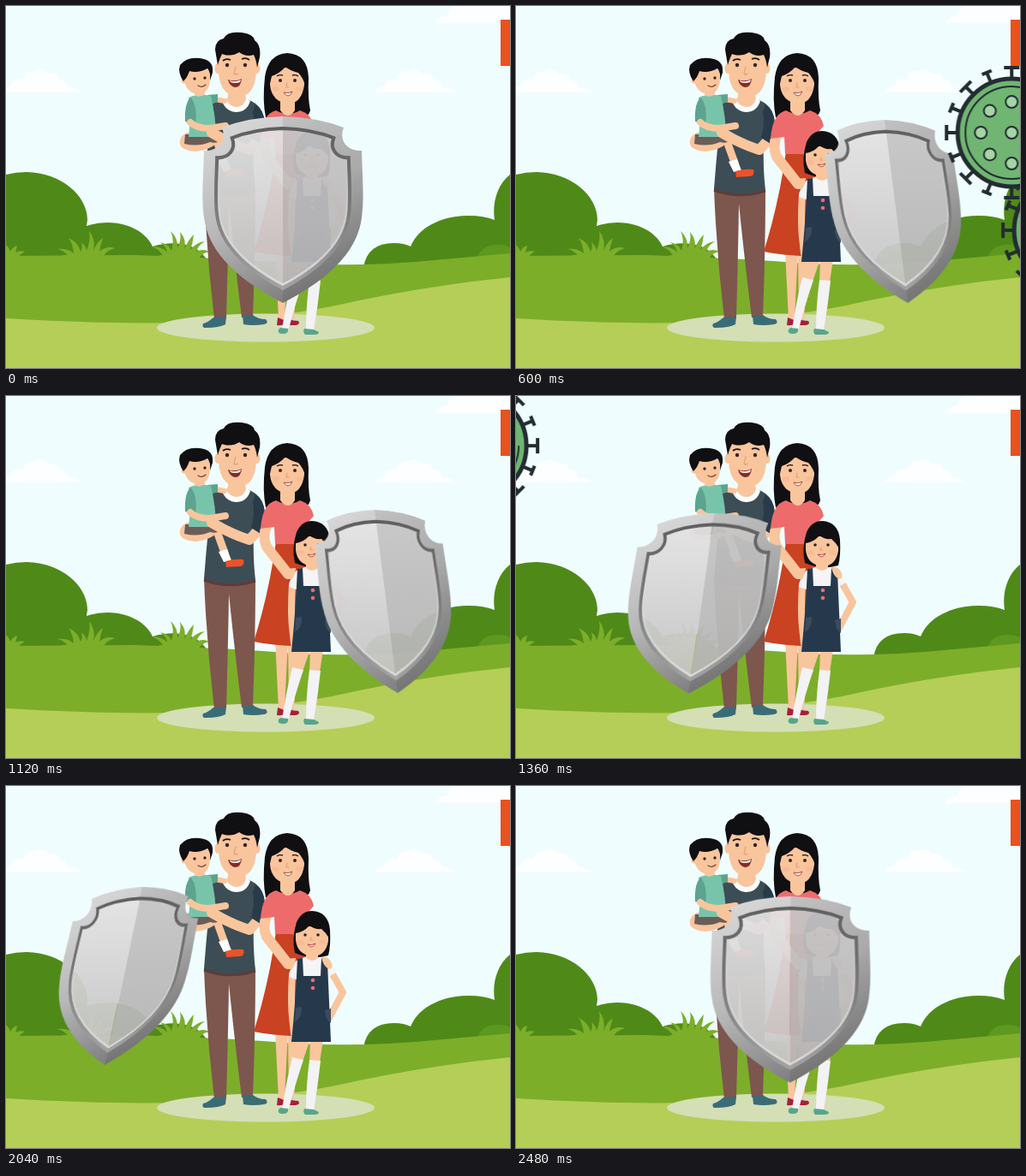
These frames come from a looping animation (588 by 423 pixels, 2.52 s). An HTML page:

```html
<!DOCTYPE html>
<html lang="en">
<head>
<meta charset="utf-8">
<title>Family behind a shield</title>
<style>
html, body { margin: 0; width: 100%; height: 100%; overflow: hidden; background: #f0fdff; }
svg { display: block; width: 588px; height: 423px; }
.skin { fill: #f9c59d; }
.limb { fill: none; stroke: #f9c59d; stroke-linecap: round; stroke-linejoin: round; }
.hair { fill: #100f12; }
.eye { fill: #39231f; }
.line { fill: none; stroke: #7b3a2c; stroke-width: 1.2; stroke-linecap: round; }
.nose { fill: none; stroke: #e59f7b; stroke-width: 1.2; stroke-linecap: round; }
.blush { fill: #f4a788; opacity: .3; }
.dark { fill: #4f8a18; }
.mid { fill: #7dae29; }
.move { animation: 2520ms linear infinite; }
#shield { animation-name: guard; }
#r1 { animation-name: right1; }
#r2 { animation-name: right2; }
#l1 { animation-name: left1; }
#l2 { animation-name: left2; }

@keyframes guard {
  0% { transform: matrix(1, 0, 0, 1, 323, 129); animation-timing-function: ease-in-out; }
  17.46% { transform: matrix(.81, 0, .124, .982, 430, 133); }
  44.44% { transform: matrix(.81, 0, .124, .982, 430, 133); animation-timing-function: ease-in; }
  53.97% { transform: matrix(.915, -.01, -.137, .968, 232, 137); animation-timing-function: ease-out; }
  59.5% { transform: matrix(.795, -.02, -.2, .954, 159, 118); }
  82.54% { transform: matrix(.795, -.02, -.2, .954, 159, 118); animation-timing-function: ease-in-out; }
  100% { transform: matrix(1, 0, 0, 1, 323, 129); }
}
@keyframes right1 {
  0%, 9.52% { transform: translate(675px, 118px); }
  23.81% { transform: translate(578px, 148px); }
  38.1%, 100% { transform: translate(675px, 134px); }
}
@keyframes right2 {
  0%, 14.29% { transform: translate(675px, 246px); }
  23.81% { transform: translate(644px, 262px); }
  33.33%, 100% { transform: translate(675px, 272px); }
}
@keyframes left1 {
  0%, 47.62% { transform: translate(-82px, 37px); }
  53.97% { transform: translate(-51px, 58px); }
  66.67% { transform: translate(5px, 99px); }
  77.78%, 100% { transform: translate(-90px, 81px); }
}
@keyframes left2 {
  0%, 53.97% { transform: translate(-85px, 250px); }
  66.67% { transform: translate(17px, 285px); }
  77.78%, 100% { transform: translate(-90px, 298px); }
}
</style>
</head>
<body>
<svg viewBox="0 0 588 423">
  <defs>
    <path id="cloud" fill="#fdfeff" d="M-6 101Q-2 94 5 94Q8 83 20 86Q22 75 34 76Q43 72 49 79Q60 77 63 86Q71 87 73 95Q82 94 88 101Z"/>
    <path id="plate" d="M0 0Q40 1 71 13C65 28 75 41 92 40C93 75 95 98 92 118C88 152 62 186 0 218C-62 186 -88 152 -92 118C-95 98 -93 75 -92 40C-75 41 -65 28 -71 13Q-40 1 0 0Z"/>
    <linearGradient id="rim" x1=".2" y1="0" x2=".6" y2="1">
      <stop offset="0" stop-color="#d8d8d8"/><stop offset=".5" stop-color="#b8b8b8"/><stop offset="1" stop-color="#7a7a7a"/>
    </linearGradient>
    <linearGradient id="edge" x1="0" y1="0" x2="0" y2="1">
      <stop offset="0" stop-color="#5f5f5f"/><stop offset=".5" stop-color="#7a7a7a"/><stop offset="1" stop-color="#a2a2a2"/>
    </linearGradient>
    <linearGradient id="lit" x1="0" y1="0" x2="0" y2="1">
      <stop offset="0" stop-color="#e4e3e4"/><stop offset="1" stop-color="#c4c3c4"/>
    </linearGradient>
    <linearGradient id="shade" x1="0" y1="0" x2="0" y2="1">
      <stop offset="0" stop-color="#c6c5c6"/><stop offset="1" stop-color="#b4b3b4"/>
    </linearGradient>
    <linearGradient id="glint" x1="0" y1="0" x2="0" y2="1">
      <stop offset=".2" stop-color="#ddd" stop-opacity="0"/><stop offset="1" stop-color="#ddd"/>
    </linearGradient>
    <clipPath id="outer"><use href="#plate"/></clipPath>
    <mask id="frame" maskUnits="userSpaceOnUse" x="-100" y="-5" width="200" height="230">
      <rect x="-100" y="-5" width="200" height="230" fill="#fff"/>
      <use href="#plate" transform="translate(0 14) scale(.835 .857)"/>
    </mask>
    <g id="virus" stroke="#222c32">
      <g id="spikes" fill="none" stroke-width="4"></g>
      <circle r="63" fill="#70b571" stroke-width="5"/>
      <circle r="54" fill="none" stroke-width="2" pathLength="100" stroke-dasharray="80 4 7 9"/>
      <g id="spots" fill="#a6d5a5" stroke-width="2"></g>
    </g>
  </defs>

  <rect width="588" height="423" fill="#f0fdff"/>
  <use href="#cloud"/>
  <use href="#cloud" x="436"/>
  <path fill="#fdfeff" d="M500 20Q506 11 516 11Q515 2 525 0H588V20Z"/>

  <g class="dark">
    <path d="M0 197Q12 194 24 194C64 195 95 221 95 250L94 257Q106 253 118 253C146 253 165 267 171 281Q194 274 214 280Q230 286 236 300H0Z"/>
    <path d="M417 306Q421 277 453 277Q464 277 472 281C482 257 510 245 540 245Q557 245 570 250C567 230 573 209 588 197V306Z"/>
  </g>
  <path fill="#5c991e" d="M550 294Q555 279 574 279Q582 279 588 282V294Z"/>
  <path class="mid" d="M0 292L150 291Q250 294 340 301Q420 305 500 297L588 289V423H0Z"/>
  <g class="mid">
    <path d="M60 294Q68 290 72 291Q66 285 60 284Q72 283 79 289Q78 278 73 271Q84 276 87 287Q90 282 88 276Q93 280 94 286Q99 274 97 263Q105 273 102 286Q106 276 113 271Q110 280 109 287Q117 280 127 283Q117 286 114 292L120 295Z"/>
    <path d="M168 296Q178 291 183 291Q177 283 170 281Q182 281 188 288Q187 281 180 276Q190 278 193 286Q197 273 192 263Q201 271 200 283Q205 273 203 264Q211 273 208 284Q213 273 219 267Q218 277 215 285Q222 276 232 275Q224 280 222 287Q230 283 237 287Q228 289 225 295Z"/>
    <path d="M0 294V279Q4 283 5 287Q8 281 13 280Q12 285 11 288Q16 285 22 287Q15 291 13 295Z"/>
  </g>
  <path fill="#b5ce57" d="M0 365Q120 372 200 370Q290 368 380 351Q480 328 588 317V423H0Z"/>
  <ellipse cx="303" cy="376" rx="127" ry="16.5" fill="#d4dfb5"/>

  <g id="father">
    <path fill="#7d564e" d="M231 214L291 214Q291 290 288 363L275 364Q267 300 260 231Q259 300 257 365L243 366Q234 290 231 214Z"/>
    <path fill="#3a6c78" d="M242 364Q235 370 230 371Q228 376 233 376Q249 376 256 372L257 363ZM276 362L288 361Q294 366 303 366Q307 371 301 372Q288 374 277 372Z"/>
    <path fill="#3d4d55" d="M241 113Q250 110 255 109H281Q294 113 297 122L289 160Q288 190 291 215Q260 226 231 214Q235 160 241 113Z"/>
    <path fill="none" stroke="#5f3b38" stroke-width="3" d="M231 215Q260 226 291 216"/>
    <path class="skin" d="M211 148Q201 153 203 162Q206 169 222 170Q238 168 246 160V150Z"/>
    <path fill="#fff" d="M252 111L259 107H279L285 111Q281 124 268 124Q256 123 252 111Z"/>
    <path class="skin" d="M259 96H278L280 109Q277 118 268 118Q260 117 257 109L259 106Z"/>
    <ellipse class="skin" cx="247" cy="73" rx="3.5" ry="6"/><ellipse class="skin" cx="293" cy="73" rx="3.5" ry="6"/>
    <path class="skin" d="M248 58Q270 45 292 57V76Q291 106 270 106Q249 104 248 76Z"/>
    <path class="hair" d="M247 69L244 51Q244 40 254 38Q258 29 275 31Q289 33 290 40Q298 46 296 60L293 72Q292 63 289 57Q280 60 272 54Q263 60 252 56Q249 62 247 69Z"/>
    <path fill="none" stroke="#1b1518" stroke-width="1.8" d="M253 64Q257 61 262 63M275 62Q280 60 284 63"/>
    <circle class="eye" cx="258" cy="69" r="2.2"/><circle class="eye" cx="279" cy="69" r="2.2"/>
    <path class="nose" d="M268 71L266 79Q268 81 270 79"/>
    <path fill="#862c27" d="M259 86Q267 89 275 85Q274 95 267 95Q261 94 259 86Z"/>
    <path fill="#fff" d="M261 87Q267 90 274 86L273 89Q267 91 262 89Z"/>
  </g>

  <g id="boy">
    <path class="limb" stroke-width="6" d="M244 109L255 111"/>
    <path class="limb" stroke-width="9" d="M246 158L255 183"/>
    <path fill="#fff" d="M248 182L258 179L263 192L254 194Z"/>
    <path fill="#ec522a" d="M256 193Q266 190 277 191Q279 198 273 199L257 200Z"/>
    <path fill="#6a5d59" d="M209 150H248L252 154Q247 162 238 159Q224 165 208 161Z"/>
    <path fill="#5aa48f" d="M235 104L247 103V112L239 115Z"/>
    <path fill="#78c4aa" d="M213 107Q225 101 239 105Q245 130 245 153H213Q216 130 213 107Z"/>
    <path fill="#5da38f" d="M216 107Q208 112 209 135L221 138Q224 118 216 107Z"/>
    <path class="skin" d="M220 98H232V103Q226 108 220 104Z"/>
    <circle class="skin" cx="208" cy="87" r="3.5"/>
    <path class="skin" d="M208 77Q224 66 238 76V86Q237 102 225 103Q210 102 208 86Z"/>
    <path class="hair" d="M207 88Q200 78 203 69Q211 59 226 61Q243 63 241 78L238 87Q239 77 235 73Q224 79 214 76Q212 83 207 88Z"/>
    <circle class="eye" cx="220" cy="85" r="1.7"/><circle class="eye" cx="232" cy="84" r="1.7"/>
    <path class="line" d="M224 93Q229 96 233 92"/>
    <path class="limb" stroke-width="8" d="M215 136Q222 143 238 143L256 140"/>
  </g>
  <path class="limb" stroke-width="12" d="M293 158L284 168Q264 162 240 148"/>
  <path fill="#293a49" d="M291 115Q301 121 302 136Q302 150 297 161L286 154Q291 137 288 124Z"/>

  <g id="mother">
    <path class="hair" d="M303 130Q299 111 302 83Q306 56 328 55Q352 56 353 84Q352 108 355 122Q353 130 343 132H308Z"/>
    <path class="skin" d="M314 286H329L325 366H318ZM329 286H341L336 367H330Z"/>
    <path fill="#a51f3c" d="M317 364L327 368Q327 374 316 373ZM330 366Q336 368 341 368Q344 372 338 373H329Z"/>
    <path fill="#c94222" d="M315 170H347Q354 230 350 292Q318 293 289 287Q307 230 315 170Z"/>
    <path class="limb" stroke-width="12" d="M304 152Q299 164 304 176L329 208"/>
    <path fill="#ee6b6c" d="M315 122Q329 130 343 122Q356 126 359 140L349 152V173H314L313 153L297 155Q299 126 315 122Z"/>
    <path class="skin" d="M320 106H337V122Q329 134 320 122Z"/>
    <path class="skin" d="M308 78Q327 65 348 80V92Q345 114 329 114Q310 112 308 92Z"/>
    <path class="hair" d="M307 95Q302 70 326 60Q352 66 350 96Q347 84 341 78Q332 76 326 71Q319 79 310 82Z"/>
    <path fill="none" stroke="#231719" stroke-width="1.3" d="M316 82Q319 80 323 81M334 81Q338 80 341 82"/>
    <circle class="eye" cx="320" cy="87" r="2"/><circle class="eye" cx="337" cy="87" r="2"/>
    <ellipse class="blush" cx="315" cy="97" rx="4" ry="3"/><ellipse class="blush" cx="342" cy="97" rx="4" ry="3"/>
    <path class="nose" d="M328 90L327 95H330"/>
    <path fill="#fff" stroke="#a33c34" stroke-width=".9" d="M324 101Q329 103 334 100Q332 105 329 105Q325 104 324 101Z"/>
  </g>

  <g id="girl">
    <path class="limb" stroke-width="8" d="M334 220Q332 250 334 270L336 289M380 218L393 241L377 271"/>
    <path class="skin" d="M338 296H355L346 322H334ZM355 296H370L366 323H354Z"/>
    <path fill="#f3f2f5" d="M334 317L347 320Q337 350 330 377L322 378Q327 345 334 317ZM354 320L367 321Q364 350 359 379H350Q350 350 354 320Z"/>
    <path fill="#57a58b" d="M320 376L329 377Q330 383 323 383Q316 383 318 378ZM348 377L359 378L365 381Q365 384 360 384H349Q346 381 348 377Z"/>
    <path fill="#f5f4f6" d="M342 202L356 198L372 202Q381 208 385 218L376 223L369 228H344L330 223Q332 207 342 202Z"/>
    <path fill="#26394c" d="M340 202L346 201L347 222H367L368 201L375 206L379 299H333Q338 250 340 202Z"/>
    <path fill="#3a4c5d" d="M338 259L345 258Q346 270 337 276ZM372 262L379 260V277Q373 274 372 262Z"/>
    <circle cx="358" cy="227" r="2.3" fill="#ee6b6c"/><circle cx="358" cy="236" r="2.3" fill="#ee6b6c"/>
    <path class="hair" d="M337 195Q333 178 339 159Q345 146 357 146Q376 147 378 168Q379 187 376 198Q357 204 337 195Z"/>
    <path class="skin" d="M350 192H364V201Q357 207 350 201Z"/>
    <path class="skin" d="M338 171Q355 157 376 170V181Q373 199 357 199Q340 197 338 180Z"/>
    <path class="hair" d="M337 178Q335 154 355 150Q378 151 377 178Q373 171 368 167Q360 168 354 163Q347 171 338 172Z"/>
    <circle class="eye" cx="349" cy="174" r="1.8"/><circle class="eye" cx="364" cy="174" r="1.8"/>
    <ellipse class="blush" cx="344" cy="183" rx="4" ry="3"/><ellipse class="blush" cx="369" cy="183" rx="4" ry="3"/>
    <path class="nose" d="M356 177L355 180H358"/>
    <path fill="#fff" stroke="#a33c34" stroke-width=".9" d="M352 185Q356 187 361 184Q359 188 356 188Q353 187 352 185Z"/>
    <path class="skin" d="M368 200Q376 198 380 207Q382 213 377 214Q370 211 368 200ZM322 202Q330 202 338 201Q338 208 333 215Q327 212 322 202Z"/>
  </g>

  <g id="shield" class="move">
    <g mask="url(#frame)">
      <use href="#plate" fill="url(#rim)"/>
      <rect width="96" height="218" clip-path="url(#outer)" opacity=".08"/>
    </g>
    <g transform="translate(0 14) scale(.835 .857)">
      <g clip-path="url(#outer)" opacity=".94">
        <rect x="-96" width="96" height="218" fill="url(#lit)"/>
        <rect width="96" height="218" fill="url(#shade)"/>
      </g>
      <use href="#plate" fill="none" stroke="url(#edge)" stroke-width="4.8"/>
    </g>
    <use href="#plate" transform="translate(0 17.5) scale(.8 .82)" fill="none" stroke="url(#glint)" stroke-width="2.6"/>
  </g>

  <use id="r1" class="move" href="#virus"/>
  <use id="r2" class="move" href="#virus"/>
  <use id="l1" class="move" href="#virus"/>
  <use id="l2" class="move" href="#virus"/>

  <rect x="577" y="16" width="54" height="54" fill="#e9511f"/>
</svg>
<script>
const ring = (n, draw) => Array.from({ length: n }, (_, i) => draw(i, i * 360 / n)).join('');

document.getElementById('spikes').innerHTML = ring(16, (i, a) => {
  const half = i % 2 ? 6 : 9;
  return `<path d="M63 0H76M76 ${-half}V${half}" transform="rotate(${a})"/>`;
});
document.getElementById('spots').innerHTML = '<circle r="7"/>' +
  ring(8, (i, a) => `<circle cx="36" r="7" transform="rotate(${a})"/>`);
</script>
</body>
</html>
```
